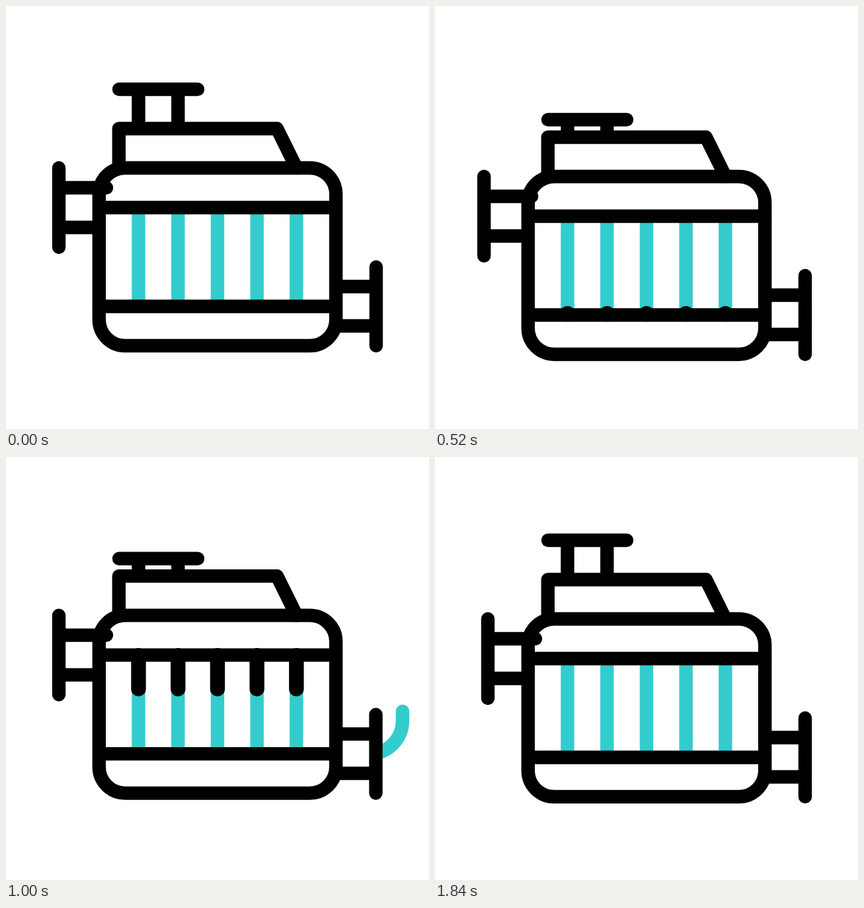
These frames come from a looping animation (640x640 px, 2000 ms). An HTML page:

```html
<!DOCTYPE html>
<html>
<head>
<meta charset="utf-8">
<style>
  html, body { margin: 0; width: 100%; height: 100%; overflow: hidden; background: #fff; }
  svg { display: block; width: 100%; height: 100%; }
  path, rect { fill: none; stroke: #000; stroke-width: 20.4; stroke-linecap: round; stroke-linejoin: round; }
  .teal { stroke: #3cc; }
  .tube { stroke-linecap: butt; }
  .mask { fill: #fff; stroke: none; }
  .fluid { stroke-width: 22.4; }
</style>
</head>
<body>
<svg viewBox="0 0 640 640">
  <g id="engine">
    <path id="intake" d="M-20 304.4L80 303.4"/>
    <path id="exhaust" class="teal" d="M550 454.5A50 50 0 0 0 600 404.5V97.5A50 50 0 0 1 650 47.5H686"/>
    <g id="left">
      <path class="mask" d="M80 265H160V345H80z"/>
      <path d="M80 245V365M80 275H152M80 335H152"/>
    </g>
    <g id="right">
      <path class="mask" d="M490 414H560V494H490z"/>
      <path d="M560 395V514M500 424.5H560M500 484H560"/>
    </g>
    <path class="mask" d="M141 290H499V470H141z"/>
    <g id="cap"><path d="M171 126H290"/><path class="tube" id="legs"/></g>
    <path d="M170.8 240V185.5H410L439.5 245"/>
    <g id="tubes"></g>
    <rect x="140.8" y="245" width="358.4" height="269" rx="39.5"/>
    <path d="M141 305H499M141 454.5H499"/>
  </g>
</svg>
<script>
const $ = id => document.getElementById(id);
const xs = [200.5, 260.3, 320, 379.7, 439.4];
$('tubes').innerHTML = xs.map(x =>
  `<path class="teal tube" d="M${x} 305V454"/><path class="fluid" d="M${x} 453.5V305.5"/>`).join('');
const fluids = document.querySelectorAll('.fluid');

// Eased value through [time, value] keys
function track(t, keys) {
  if (t <= keys[0][0]) return keys[0][1];
  for (let i = 1; i < keys.length; i++) {
    const [a, from] = keys[i - 1], [b, to] = keys[i];
    if (t < b) {
      const u = (t - a) / (b - a);
      return from + (to - from) * u * u * (3 - 2 * u);
    }
  }
  return keys[keys.length - 1][1];
}

const move = (id, x, y) => $(id).setAttribute('transform', `translate(${x} ${y})`);

// Shows the part of a path between its eased tail and head
function trim(path, t, length, headStart, headEnd, tailStart, tailEnd) {
  const head = track(t, [[headStart, 0], [headEnd, length]]);
  const tail = track(t, [[tailStart, 0], [tailEnd, length]]);
  path.style.visibility = head > tail ? 'visible' : 'hidden';
  path.style.strokeDasharray = `${head - tail} 2000`;
  path.style.strokeDashoffset = -tail;
}

function draw(now) {
  const t = Math.floor(now % 2000 / 40) * 40;
  const press = track(t, [[100, 0], [370, 33.1], [1290, 33.1], [1840, 0]]);
  move('engine', 0, track(t, [[100, 0], [670, 15.6], [1250, -19.2], [1840, 0]]));
  move('cap', 0, press);
  $('legs').setAttribute('d', `M200.5 126V${185 - press}M260.3 126V${185 - press}`);
  move('left', track(t, [[100, 0], [370, -14], [640, 0]]), 0);
  move('right', track(t, [[960, 0], [1240, -8], [1520, 0]]), 0);
  trim($('intake'), t, 100, 100, 360, 200, 570);
  for (const f of fluids) trim(f, t, 148, 500, 860, 800, 1130);
  trim($('exhaust'), t, 500, 848, 1400, 1070, 1872);
}

const start = performance.now();
function loop() {
  draw(performance.now() - start);
  requestAnimationFrame(loop);
}
loop();
</script>
</body>
</html>
```
